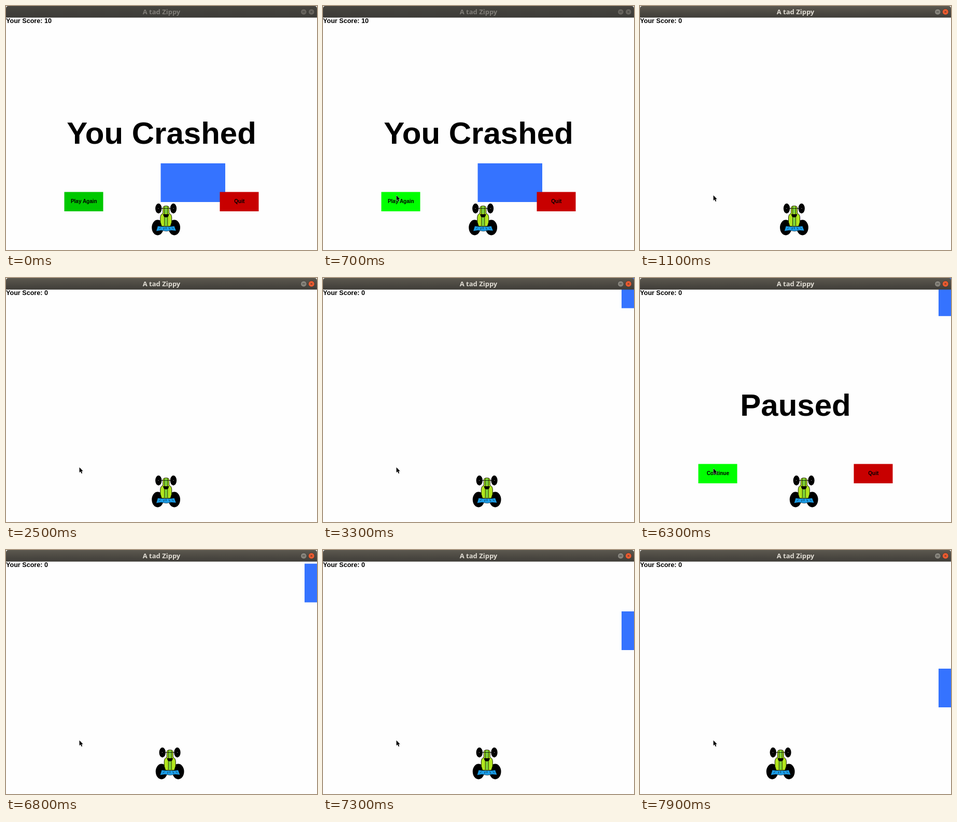
Animation of 600 by 473 pixels, one loop 8000 ms. Source, as an HTML page:

```html
<!DOCTYPE html>
<html lang="en">
<head>
<meta charset="utf-8">
<title>A tad Zippy</title>
<style>
  html, body { margin: 0; width: 100%; height: 100%; overflow: hidden; background: #fefefe; }
  svg { display: block; width: 600px; height: 473px; }
  text { font-family: "Liberation Sans", Arial, sans-serif; font-weight: bold; }
  .mid { text-anchor: middle; }
  .big { font-size: 60px; }
  .label { font-size: 10px; }
  #title { font: bold 13px "Noto Sans", "Open Sans", sans-serif; }
</style>
</head>
<body>
<svg viewBox="0 0 600 473">
  <defs>
    <linearGradient id="active" x2="0" y2="1">
      <stop offset="0" stop-color="#5c584f"/>
      <stop offset="1" stop-color="#3f3d38"/>
    </linearGradient>
    <linearGradient id="idle" x2="0" y2="1">
      <stop offset="0" stop-color="#474540"/>
      <stop offset="1" stop-color="#3c3b37"/>
    </linearGradient>
  </defs>
  <rect width="600" height="473" fill="#fefefe"/>

  <rect id="block" height="75" fill="#3573ff"/>

  <!-- the car's left edge is x = 0, its nose is y = 0 -->
  <g id="car" stroke="#000">
    <path d="M13 9.500H42M20 40L12 46M35 40L43 46" fill="none" stroke-width="1.200"/>
    <g stroke="none">
      <ellipse cx="13" cy="9.500" rx="6.200" ry="9.700"/>
      <ellipse cx="41.700" cy="9.500" rx="6.200" ry="9.700"/>
      <ellipse cx="11.300" cy="46.500" rx="11.300" ry="15"/>
      <ellipse cx="43.500" cy="46.500" rx="11.300" ry="15"/>
    </g>
    <path d="M21.500 8Q22 4.500 27.500 4.500Q33 4.500 33.500 8V19Q38.500 21 38.500 27V36L36 44H19L16.500 36V27Q16.500 21 21.500 19Z" fill="#b2e61d" stroke-width=".9"/>
    <path d="M24 6H31V19H24ZM25 27H30V43H25Z" fill="#7fd437" stroke="none"/>
    <path d="M24.500 5.500V43M30.500 5.500V43M21.500 9.500H33.500" fill="none" stroke-width=".8"/>
    <path d="M21.500 20.500H33.500L31.500 25.500Q27.500 28 23.500 25.500Z" stroke="none"/>
    <path d="M11.500 43.500L20 44.500H36L43.500 43.500L47 53L38 52L28 53.500L18 52L8.500 53.500Z" fill="#1b9de8" stroke-width=".6"/>
    <path d="M17 46.500L14 49.500M24 46.500L23 50.500M27.500 45.500V49.500M33 46.500L35 50.500M39 46.500L42 49.500" fill="none" stroke-width=".7"/>
    <g fill="#999" stroke="none">
      <circle cx="12.800" cy="9.500" r=".7"/>
      <circle cx="41.900" cy="9.500" r=".7"/>
    </g>
  </g>

  <text id="score" x="0" y="33" font-size="12.600"></text>
  <text id="banner" class="mid big" x="300" y="267"></text>

  <g id="menu">
    <rect id="go" x="112.500" y="360.500" width="75" height="37.500"/>
    <text id="goLabel" class="mid label" x="150.300" y="382"></text>
    <rect x="412.500" y="360.500" width="75" height="37.500" fill="#c80000"/>
    <text class="mid label" x="450.300" y="382">Quit</text>
  </g>

  <path id="bar" d="M0 22.400V5Q0 0 5 0H595Q600 0 600 5V22.400Z"/>
  <text id="title" class="mid" x="300" y="16.300">A tad Zippy</text>
  <g stroke="#33322e" stroke-width=".7">
    <circle id="minimise" cx="574.300" cy="11.400" r="5.900"/>
    <circle id="close" cx="589.300" cy="11.400" r="5.900"/>
    <path d="M572 11.400h4.600M587.700 9.800l3.200 3.200M590.900 9.800l-3.200 3.200" fill="none" stroke-width=".9"/>
  </g>

  <path id="cursor" d="M0 0V10.200L2.300 8.100L4 12L5.700 11.200L4.100 7.500H7.100Z" stroke="#fff" stroke-width=".8" paint-order="stroke"/>
</svg>
<script>
const LOOP = 8000, FRAME = 100;
const RESTART = 1000, PAUSE = 3400, RESUME = 6700;
const CAR_SPEED = 0.225, BLOCK_SPEED = 0.185;
const el = id => document.getElementById(id);
const set = (id, attrs) => {
  for (const name in attrs) el(id).setAttribute(name, attrs[name]);
};
const write = (id, text) => { el(id).textContent = text; };
const show = (id, visible) => set(id, { visibility: visible ? "visible" : "hidden" });
const move = (id, x, y) => set(id, { transform: `translate(${x} ${y})` });
const clamp = (v, lo, hi) => Math.min(hi, Math.max(lo, v));
const span = (t, from, to) => clamp(t, from, to) - from;

function carX(t) {
  if (t < RESTART) return 281.25;
  const right = Math.min(18.75, span(t, 2450, 2600) * CAR_SPEED);
  const left = span(t, 7500, 7800) * CAR_SPEED;
  const back = span(t, 7800, 7900) * CAR_SPEED;
  return 270 + right - left + back;
}

function blockBox(t) {
  if (t < RESTART) return { x: 298.5, y: 305, width: 124.5 };
  const y = t < RESUME
    ? Math.min(-1.2, -16.5 + (t - 3300) * BLOCK_SPEED)
    : 119 + (t - 7300) * BLOCK_SPEED;
  return { x: 576, y, width: 75 };
}

function cursorAt(t) {
  const p = span(t, 200, 600) / 400;
  const ease = 1 - (1 - p) ** 2;
  return { x: 25 + 116.6 * ease, y: 430 - 63 * ease + (t >= 6300 ? 2 : 0) };
}

function draw(t) {
  const crashed = t < RESTART;
  const paused = t >= PAUSE && t < RESUME;
  const cursor = cursorAt(t);
  const hover = cursor.x > 112.5 && cursor.x < 187.5 && cursor.y > 360.5 && cursor.y < 398;

  set("block", blockBox(t));
  move("car", carX(t), 383);
  move("cursor", cursor.x, cursor.y);
  show("cursor", t >= 300);

  write("score", `Your Score: ${crashed ? 10 : 0}`);
  write("banner", crashed ? "You Crashed" : paused ? "Paused" : "");
  write("goLabel", crashed ? "Play Again" : "Continue");
  show("menu", crashed || paused);
  set("go", { fill: hover ? "#00ff00" : "#00c800" });

  set("bar", { fill: crashed ? "url(#idle)" : "url(#active)" });
  set("title", { fill: crashed ? "#807d78" : "#dfdbd2" });
  set("minimise", { fill: crashed ? "#66635d" : "#85827a" });
  set("close", { fill: crashed ? "#66635d" : "#ea5b30" });
}

const start = performance.now();
function tick() {
  const t = (performance.now() - start) % LOOP;
  draw(Math.floor(t / FRAME) * FRAME);
  requestAnimationFrame(tick);
}
tick();
</script>
</body>
</html>
```
